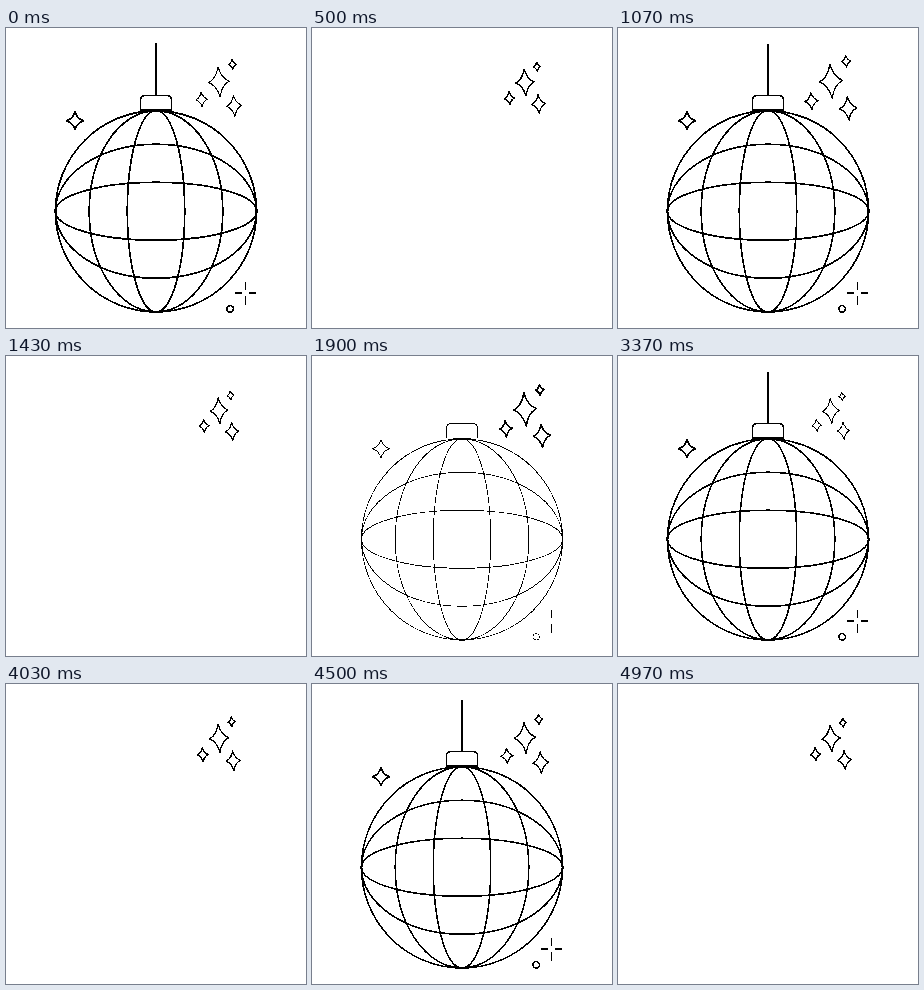
Recreate the animation shown at these times as an HTML page. Size 300 by 300 pixels, loop 5010 ms.

```html
<!DOCTYPE html>
<html lang="en">
<head>
<meta charset="utf-8">
<title>Disco ball</title>
<style>
  html, body { margin: 0; width: 100%; height: 100%; overflow: hidden; background: #fff; }
  svg { display: block; width: 100vw; height: 100vh; }
</style>
</head>
<body>
<svg viewBox="0 0 300 300" fill="none" stroke="#000" stroke-width="1.5" stroke-linecap="round" stroke-linejoin="round">
  <!-- Hard-edged ink: pixels are either black or empty -->
  <filter id="ink" filterUnits="userSpaceOnUse" x="0" y="0" width="300" height="300">
    <feComponentTransfer><feFuncA type="discrete" tableValues="0 0 1 1 1"/></feComponentTransfer>
  </filter>
  <g filter="url(#ink)">
    <g id="ball">
      <path d="M150 16V67.6M134.5 82V72.1Q134.5 67.6 139 67.6H161Q165.5 67.6 165.5 72.1V82Z"/>
      <g id="globe"></g>
      <path id="sparkle"/>
      <path stroke-width="1.3" stroke-linecap="butt" d="M239.5 254V262M239.5 268V277M229 265H236M243 265H250"/>
      <circle cx="224.2" cy="280.8" r="3.2" stroke-width="1.4"/>
    </g>
  </g>
  <g filter="url(#ink)"><g id="stars" stroke-width="1.3"></g></g>
</svg>
<script>
const LOOP = 5010, FRAMES = 150;
const BLINK = 33, PULSE = 0.2345, PULSE_START = -1.42;
const byId = id => document.getElementById(id);

function add(parent, tag, attrs) {
  const el = document.createElementNS("http://www.w3.org/2000/svg", tag);
  for (const key in attrs) el.setAttribute(key, attrs[key]);
  parent.appendChild(el);
}

function starPath(w, h) {
  const a = w * 0.23, b = h * 0.23;
  return `M0 ${-h}Q${a} ${-b} ${w} 0Q${a} ${b} 0 ${h}Q${-a} ${b} ${-w} 0Q${-a} ${-b} 0 ${-h}Z`;
}

const R = 100.6;
for (const [rx, ry] of [[R, R], [66.8, R], [28.7, R], [R, 67], [R, 29]])
  add(byId("globe"), "ellipse", { cx: 150, cy: 183.3, rx, ry });

byId("sparkle").setAttribute("d", starPath(8.5, 9));
byId("sparkle").setAttribute("transform", "translate(69 92.8)");

// x, y (from the cluster centre), half width, half height
const cluster = [
  [0, -5.5, 10.2, 15],
  [13.2, -22.8, 4, 5.2],
  [-17.1, 11.8, 5.8, 7.4],
  [15, 18.2, 7.6, 10.4]
];
for (const [x, y, w, h] of cluster)
  add(byId("stars"), "path", { d: starPath(w, h), transform: `translate(${x} ${y}) rotate(-4)` });

function draw(ms) {
  const frame = Math.min(FRAMES - 1, Math.floor((ms % LOOP) * 0.03 + 0.11));
  const phase = frame % BLINK / BLINK;
  const light = Math.abs(1 - 2 * phase);
  const scale = 0.99 + 0.16 * Math.cos(PULSE * frame + PULSE_START);
  byId("ball").setAttribute("opacity", light);
  byId("stars").setAttribute("opacity", 1 - 0.37 * light);
  byId("stars").setAttribute("transform", `translate(213 59.5) scale(${scale})`);
}

const start = performance.now();
function tick() {
  draw(performance.now() - start);
  requestAnimationFrame(tick);
}
tick();
</script>
</body>
</html>
```
